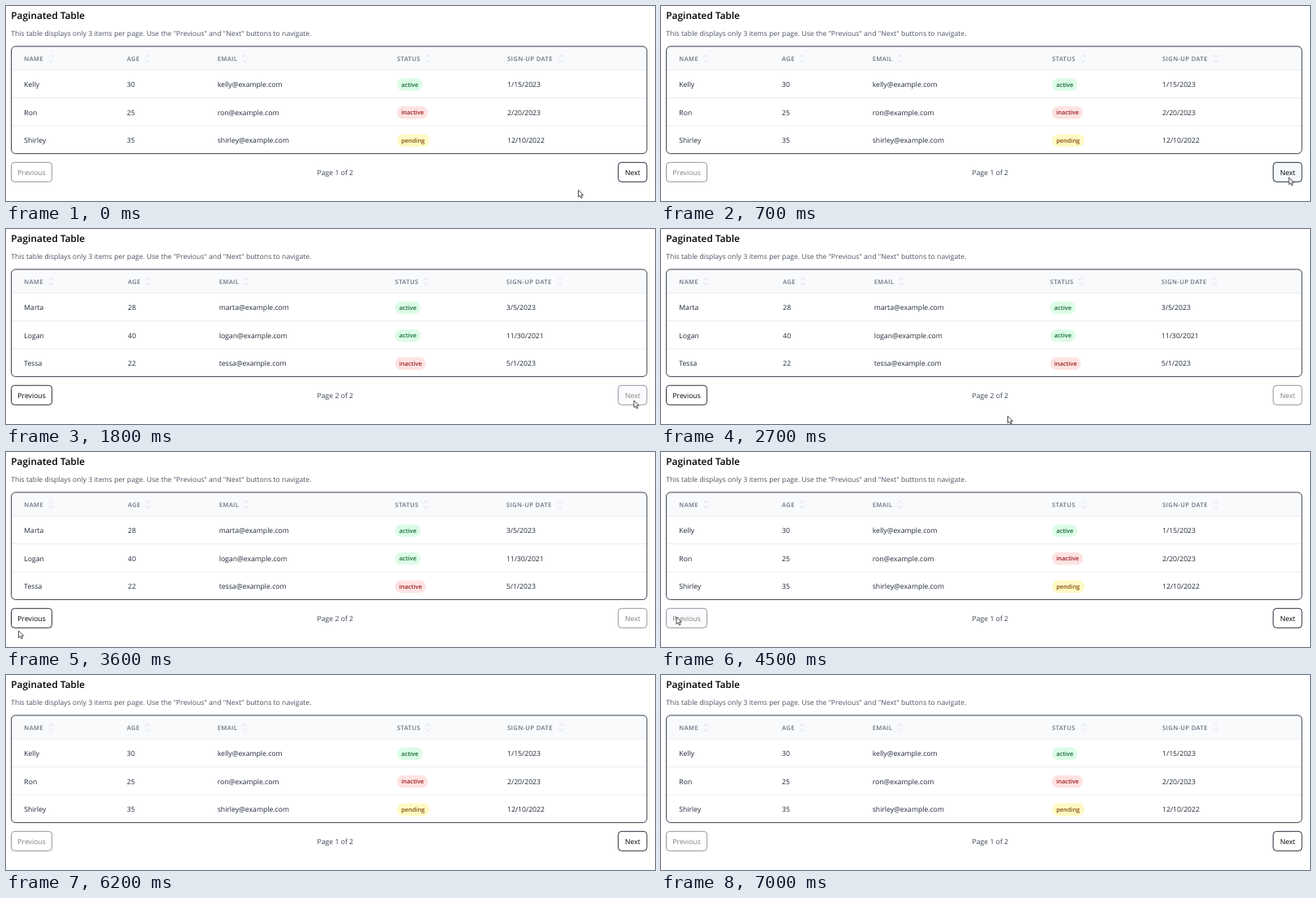
Animation, 800 px wide and 241 px high, one loop 7100 ms. Source, as an HTML page:

```html
<!DOCTYPE html>
<html lang="en">
<head>
<meta charset="utf-8">
<title>Paginated Table</title>
<style>
  html, body { margin: 0; width: 100%; height: 100%; overflow: hidden; background: #fff; }
  svg { display: block; width: 800px; height: 241px; }
  text { font: 8.67px "Open Sans", "Noto Sans", sans-serif; fill: #1f2937; text-rendering: geometricPrecision; }
  .title { font-size: 11.9px; font-weight: 600; fill: #000; }
  .sub { fill: #4b5563; }
  .th { font-size: 7.6px; font-weight: 600; letter-spacing: .39px; fill: #6b7280; }
  .badge { font-size: 7.4px; font-weight: 600; }
  .pager { fill: #374151; text-anchor: middle; }
  .line { stroke: #e5e7eb; stroke-width: .8; }
  .sort { fill: none; stroke: #d1d5db; stroke-width: .7; }
  .frame { fill: none; stroke: #1f2937; stroke-width: .9; }
  .button rect { fill: #fff; stroke: #111827; stroke-width: .9; }
  .button text { fill: #000; text-anchor: middle; }
  .button.hover rect { fill: #f5f8fb; }
  .button.off { opacity: .5; }
</style>
</head>
<body>
<svg id="stage" viewBox="0 0 800 241"></svg>
<script>
const LOOP = 7100, STEP = 100;
const NEXT_CLICK = 1200, PREV_CLICK = 4200;

const headers = ["NAME", "AGE", "EMAIL", "STATUS", "SIGN-UP DATE"];
const badgeStyles = {
  active:   { w: 31.5, bg: "#dcfce7", ink: "#166534" },
  inactive: { w: 38,   bg: "#fee2e2", ink: "#991b1b" },
  pending:  { w: 40,   bg: "#fef9c3", ink: "#854d0e" }
};
const pages = [
  {
    cols: [22.3, 149, 260.7, 482, 618],
    sorts: [55.5, 174, 294.5, 520.5, 684],
    rows: [
      ["Kelly", 30, "active", "1/15/2023"],
      ["Ron", 25, "inactive", "2/20/2023"],
      ["Shirley", 35, "pending", "12/10/2022"]
    ]
  },
  {
    cols: [22.3, 150.2, 262.7, 479.6, 616.8],
    sorts: [55.5, 175, 296, 517.5, 682.7],
    rows: [
      ["Marta", 28, "active", "3/5/2023"],
      ["Logan", 40, "active", "11/30/2021"],
      ["Tessa", 22, "inactive", "5/1/2023"]
    ]
  }
];
const buttons = {
  prev: { x: 6.5, w: 50.2, label: "Previous" },
  next: { x: 754.7, w: 35.3, label: "Next" }
};
const BTN_Y = 193.3, BTN_H = 24;

// Pointer tip: time, x, y
const path = [
  [0, 705.5, 227.5], [200, 712, 227], [600, 774, 212], [1900, 774, 212],
  [2400, 660, 226], [2800, 350, 233], [3200, 75, 231], [3500, 15.5, 221],
  [3600, 15.5, 221], [3900, 19, 204], [4800, 19, 204], [5500, 211, 183.7],
  [5800, 300, 95], [6200, 390, -14], [LOOP, 390, -14]
];

const text = (x, y, str, cls = "", extra = "") =>
  `<text x="${x}" y="${y}" class="${cls}" ${extra}>${str}</text>`;

const sortIcon = x =>
  `<path class="sort" d="M${x - 3} 63.4l3-2.9 3 2.9M${x - 3} 66.4l3 2.9 3-2.9"/>`;

function badge(x, y, status) {
  const { w, bg, ink } = badgeStyles[status];
  return `<rect x="${x}" y="${y - 7.5}" width="${w}" height="15.6" rx="7.8" fill="${bg}"/>` +
    text(x + 5.2, y + 3, status, "badge", `style="fill:${ink}"`);
}

function row([name, age, status, date], i, cols) {
  const y = 96.9 + i * 34.5, base = y + 3.2;
  const cells = [name, age, name.toLowerCase() + "@example.com", null, date];
  return cells.map((c, k) => c === null ? badge(cols[k], y, status) : text(cols[k], base, c)).join("");
}

const pageGroup = ({ cols, sorts, rows }, i) => `<g class="page">` +
  headers.map((h, k) => text(cols[k], 67.8, h, "th") + sortIcon(sorts[k])).join("") +
  rows.map((r, k) => row(r, k, cols)).join("") +
  text(405.8, 209, `Page ${i + 1} of 2`, "pager") + `</g>`;

const button = (id, { x, w, label }) => `<g class="button" id="${id}">
  <rect x="${x}" y="${BTN_Y}" width="${w}" height="${BTN_H}" rx="4"/>
  ${text(x + w / 2, 209, label)}</g>`;

const stage = document.getElementById("stage");
stage.innerHTML =
  text(6.3, 16.3, "Paginated Table", "title") +
  text(6.3, 36.6, "This table displays only 3 items per page. Use the \"Previous\" and \"Next\" buttons to navigate.", "sub") +
  `<path fill="#f8fafc" d="M6.6 79V54.9q0-5 5-5H785q5 0 5 5V79z"/>` +
  [79, 113.5, 148].map(y => `<path class="line" d="M7 ${y}H789.6"/>`).join("") +
  `<rect class="frame" x="6.6" y="49.9" width="783.4" height="132.5" rx="5"/>` +
  Object.entries(buttons).map(([id, b]) => button(id, b)).join("") +
  pages.map(pageGroup).join("") +
  `<path id="pointer" d="M0 0V8.6L2 6.8L3.4 9.9L4.9 9.2L3.5 6.2H6.2Z" fill="#fff" stroke="#222" stroke-width=".8" stroke-linejoin="round"/>`;

const groups = stage.querySelectorAll(".page");
const pointer = document.getElementById("pointer");

function pointerAt(t) {
  const i = path.findIndex(p => p[0] > t);
  const [t0, x0, y0] = path[i - 1], [t1, x1, y1] = path[i];
  const k = (t - t0) / (t1 - t0);
  return [x0 + (x1 - x0) * k, y0 + (y1 - y0) * k];
}

function draw(now) {
  const t = Math.floor((now % LOOP) / STEP) * STEP;
  const page = t >= NEXT_CLICK && t < PREV_CLICK ? 1 : 0;
  const [px, py] = pointerAt(t);
  groups.forEach((g, i) => g.setAttribute("visibility", i === page ? "visible" : "hidden"));
  for (const [id, { x, w }] of Object.entries(buttons)) {
    const list = document.getElementById(id).classList;
    list.toggle("off", id === (page ? "next" : "prev"));
    list.toggle("hover", px >= x && px <= x + w && py >= BTN_Y && py <= BTN_Y + BTN_H);
  }
  pointer.setAttribute("transform", `translate(${px} ${py})`);
}

const start = performance.now();
function tick() {
  draw(performance.now() - start);
  requestAnimationFrame(tick);
}
tick();
</script>
</body>
</html>
```
